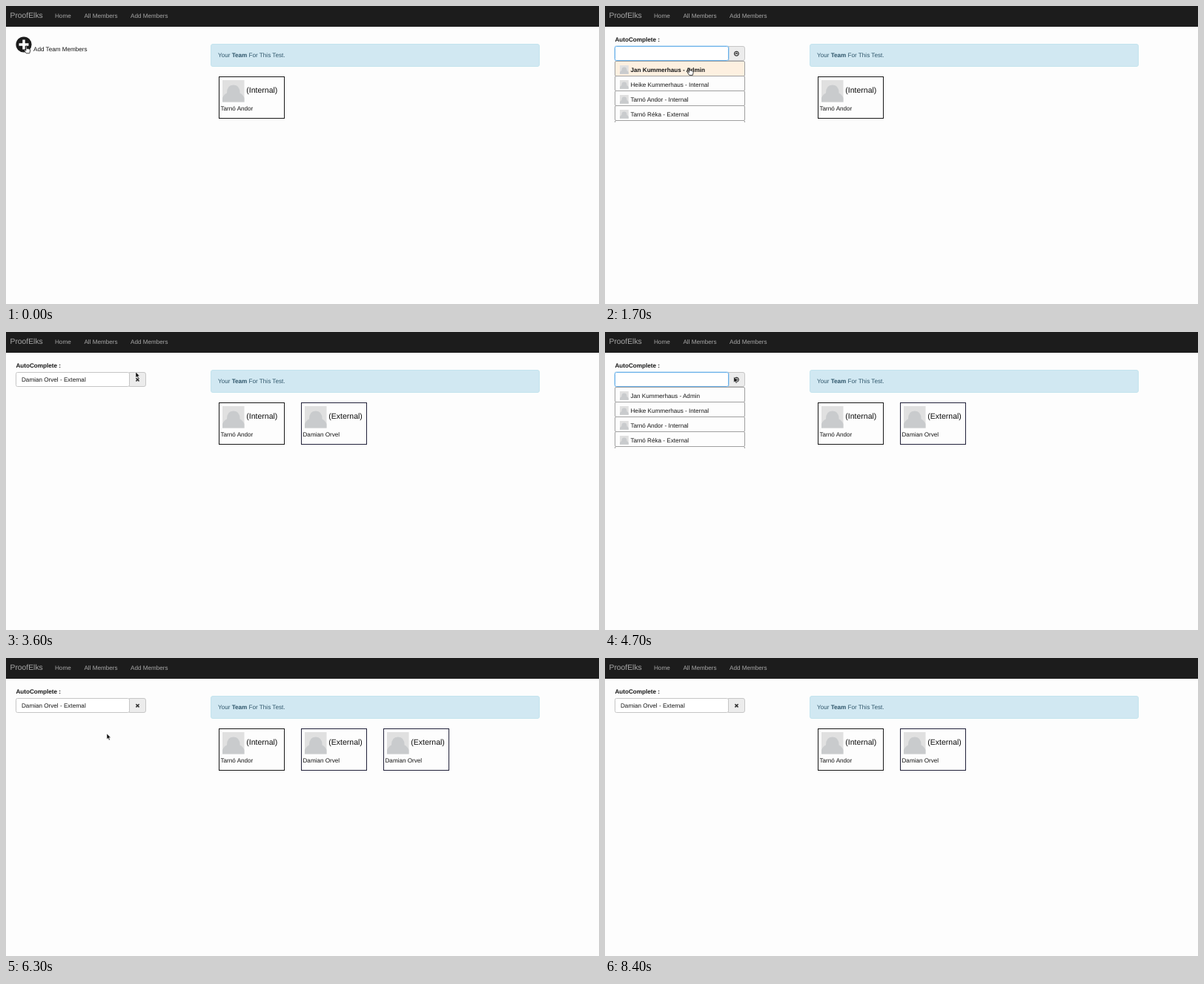
An HTML page that plays this animation: 800x402 px, repeating every 8500 ms.

```html
<!DOCTYPE html>
<html lang="en">
<head>
<meta charset="utf-8">
<title>Team picker</title>
<style>
html, body { margin: 0; width: 100%; height: 100%; overflow: hidden; background: #fdfdfd; }
svg { display: block; width: 800px; height: 402px; }
text {
  font: 8.15px "Liberation Sans", Arial, sans-serif;
  fill: #161616; white-space: pre; text-rendering: geometricPrecision;
}
.big { font-size: 10.5px; fill: #0c0c0c; }
.bold { font-weight: bold; }
.nav text { fill: #a8a8a8; }
.nav .brand { font-size: 10.35px; }
.alert text { fill: #2f566b; }
.row rect { fill: #fdfdfd; stroke: #a0a0a0; }
.row.hover rect { fill: #fdf0e0; }
.row.hover text { font-weight: bold; }
</style>
</head>
<body>
<svg viewBox="0 0 800 402">
  <defs>
    <clipPath id="listClip"><rect x="12" y="74" width="178" height="83"/></clipPath>
    <g id="avatar">
      <rect width="29.5" height="29.5" fill="#e0e0e0"/>
      <path d="M0 29.5V24Q2 19 6 17.5Q6 6.5 14.8 6.5T23.6 17.5Q27.5 19 29.5 24V29.5Z" fill="#c9cbcd"/>
    </g>
  </defs>
  <rect width="800" height="402" fill="#fdfdfd"/>
  <g class="nav">
    <rect width="800" height="28" fill="#1c1c1c"/>
    <text class="brand" x="5.5" y="16.4">ProofElks</text>
    <text x="66" y="16">Home</text>
    <text x="105.4" y="16">All Members</text>
    <text x="168" y="16">Add Members</text>
  </g>
  <g class="alert">
    <rect x="276.5" y="51.5" width="443" height="30" rx="2.5" fill="#d1e8f2" stroke="#c3e4ee"/>
    <text x="286" y="69.3">Your <tspan class="bold">Team</tspan> For This Test.</text>
  </g>
  <g id="cards"></g>
  <g id="adder">
    <circle cx="24" cy="52" r="10.6" fill="#1b1b1b"/>
    <path d="M24 45.5V58.5M17.5 52H30.5" stroke="#fff" stroke-width="3.4"/>
    <text x="37" y="60.8">Add Team Members</text>
  </g>
  <g id="picker">
    <text class="bold" x="13.5" y="48.2">AutoComplete :</text>
    <path d="M166.5 54.5H186a2.4 2.4 0 0 1 2.5 2.4V71.1a2.4 2.4 0 0 1 -2.5 2.4H166.5Z" fill="#ececec" stroke="#c6c6c6"/>
    <rect id="glow" x="12.5" y="53.5" width="155" height="21" rx="3" fill="none" stroke="#66afe9" stroke-opacity=".3"/>
    <rect id="field" x="13.5" y="54.5" width="153" height="19" rx="2" fill="#fff"/>
    <text id="value" x="21" y="67"></text>
    <path id="caret" d="M0 59.8V68.6" stroke="#333" stroke-width=".8"/>
    <g id="chevron" fill="none" stroke="#333" stroke-width="1.2">
      <circle r="2.9"/><path d="M-1.5 .7L0 -.8L1.5 .7"/>
    </g>
    <path id="cross" d="M175.4 62.2L179.6 66.4M179.6 62.2L175.4 66.4" stroke="#333" stroke-width="1.6"/>
    <g id="list" clip-path="url(#listClip)"></g>
    <rect id="thumb" x="183" width="4.2" height="33" rx="2.1" fill="#666"/>
  </g>
  <g id="cursor">
    <path id="arrow" d="M0 0V7.6L1.8 6L3 8.9L4.3 8.3L3.1 5.6H5.4Z" fill="#111" stroke="#fff" stroke-width=".5"/>
    <path id="hand" d="M-.6 .6Q0 -.3 .7 .6V3.6Q1.5 3 2.1 3.8Q2.9 3.3 3.5 4.1Q4.6 3.7 5 4.9V7L4.2 9.8H-.2L-2.6 6.5Q-3 5.2 -1.8 5.3L-.6 6.2Z" fill="#fff" stroke="#111" stroke-width=".8"/>
  </g>
</svg>
<script>
const LOOP = 8500, STEP = 100;
const LIST_TOP = 74.3, ROW = 19.8, SCROLL_MAX = 115;
const T = { showPicker: 400, open: 1100, pick: 2800, clear: 3800, reopen: 4600,
            type: 5100, pickAgain: 5900, remove: 8000, leave: 8200 };
const PICKED = 7;
const MEMBERS = [
  'Jan Kummerhaus - Admin', 'Heike Kummerhaus - Internal', 'Tarnó Andor - Internal',
  'Tarnó Réka - External', 'Robin Tallow - External', 'Nora Quell - Internal',
  'Dagmund Rabe - Admin', 'Damian Orvel - External', 'Marinka Foss - External',
  'Hetta Bramel - Internal'
];
// time, x, y of the pointer tip
const PATH = [
  [0, 27.5, 54], [400, 27.5, 54], [1000, 176, 62], [1200, 176, 62], [1700, 114, 83.5],
  [1900, 112, 90], [2500, 99, 111.5], [2600, 99, 111.5], [2800, 106, 113], [3000, 106, 113],
  [3600, 175, 54], [3800, 175, 60], [4600, 175, 60], [5500, 140, 72], [5800, 92, 101],
  [5900, 92, 101], [6300, 136, 102], [6600, 143, 106], [6700, 143, 106],
  [7500, 595, 101], [8500, 595, 101]
];

const $ = id => document.getElementById(id);
const show = (el, on) => el.setAttribute('visibility', on ? 'inherit' : 'hidden');
const move = (el, x, y, extra = '') => el.setAttribute('transform', `translate(${x} ${y}) ${extra}`);
const ease = p => p * p * (3 - 2 * p);
const progress = (t, a, b) => ease(Math.min(1, Math.max(0, (t - a) / (b - a))));
const between = (t, a, b) => t >= a && t < b;

const card = (member, i) => {
  const [name, role] = member.split(' - ');
  return `<g transform="translate(${287.5 + 111 * i} 95.5)">
    <rect width="88" height="56" fill="#fdfdfd" stroke="${i ? '#22223a' : '#181818'}"/>
    <use href="#avatar" x="4.5" y="4.5"/>
    <text class="big" x="36.8" y="21.6">(${role})</text>
    <text x="2" y="45.5">${name}</text></g>`;
};
const row = label => `<g class="row">
    <rect x="13.5" y=".5" width="175" height="20" rx="1.5"/>
    <use href="#avatar" transform="translate(20 6) scale(.4)"/>
    <text x="34.5" y="14.6">${label}</text></g>`;

$('cards').innerHTML = [MEMBERS[2], MEMBERS[PICKED], MEMBERS[PICKED]].map(card).join('');
$('list').innerHTML = MEMBERS.map(row).join('');
const cards = [...$('cards').children], rows = [...$('list').children];

function pointerAt(t) {
  const i = Math.max(1, PATH.findIndex(p => p[0] > t));
  const [t0, x0, y0] = PATH[i - 1], [t1, x1, y1] = PATH[i];
  const p = progress(t, t0, t1);
  return [x0 + (x1 - x0) * p, y0 + (y1 - y0) * p];
}

function render(t) {
  const [px, py] = pointerAt(t);
  const typed = between(t, T.type, T.pickAgain);
  const open = between(t, T.open, T.pick) || between(t, T.reopen, T.pickAgain);
  const focused = open || between(t, T.clear, T.reopen);
  const chosen = between(t, T.pick, T.clear) || t >= T.pickAgain;
  const pointerOn = !between(t, T.type, 5500) && t < T.leave;
  const scroll = t < T.pick ? SCROLL_MAX * progress(t, 1800, 2500) : 0;

  show($('adder'), t < T.showPicker);
  show($('picker'), t >= T.showPicker);
  show(cards[1], t >= T.pick);
  show(cards[2], between(t, T.pickAgain, T.remove));

  const value = chosen ? MEMBERS[PICKED] : typed ? 'd' : '';
  $('value').textContent = value;
  $('field').setAttribute('stroke', focused ? '#66afe9' : '#c6c6c6');
  show($('glow'), focused);
  show($('caret'), focused && (t + 350) % 1000 >= 500);
  move($('caret'), typed ? 26 : 21.6, 0);
  show($('cross'), value);
  show($('chevron'), !value);
  move($('chevron'), 177.4, 64.2, open ? '' : 'scale(1 -1)');

  let slot = 0, overRow = false;
  show($('list'), open);
  rows.forEach((el, i) => {
    const match = !typed || MEMBERS[i].startsWith('D');
    show(el, match);
    if (!match) return;
    const y = Math.round(LIST_TOP + ROW * slot++ - scroll);
    const hover = open && pointerOn && px < 188 && py >= LIST_TOP && py >= y && py < y + ROW;
    move(el, 0, y);
    el.classList.toggle('hover', hover);
    overRow = overRow || hover;
  });
  show($('thumb'), between(t, 1900, T.pick));
  $('thumb').setAttribute('y', 75.5 + 48 * scroll / SCROLL_MAX);

  const hand = t < T.showPicker || overRow;
  move($('cursor'), px, py);
  show($('cursor'), pointerOn);
  show($('hand'), hand);
  show($('arrow'), !hand);
}

const start = performance.now();
function tick() {
  const t = (performance.now() - start) % LOOP;
  render(Math.floor(t / STEP) * STEP);
  requestAnimationFrame(tick);
}
tick();
</script>
</body>
</html>
```
